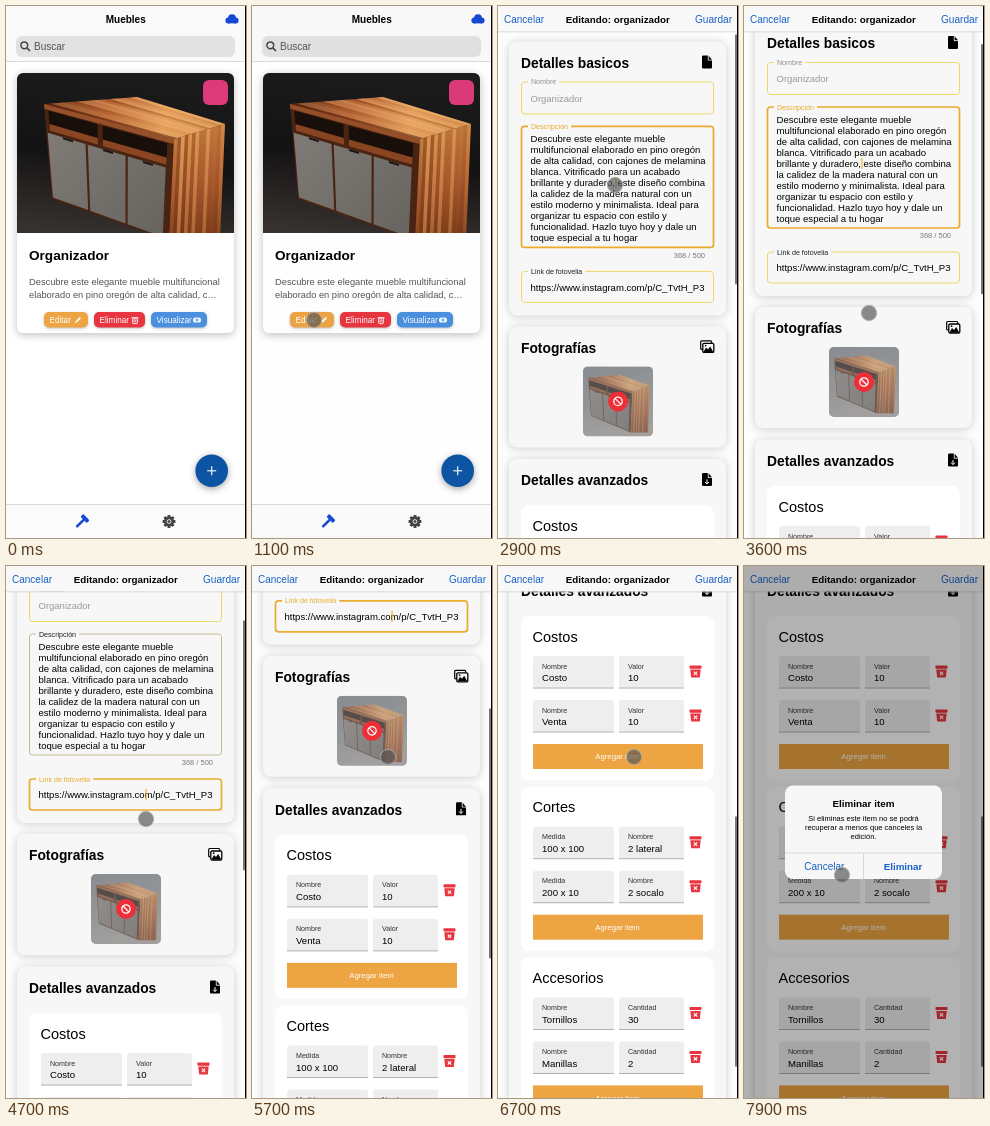
An HTML page with a canvas for the animation above (8 s loop, 240 by 532 pixels).

```html
<!DOCTYPE html>
<html lang="es">
<head>
<meta charset="utf-8">
<title>Muebles</title>
<style>
html, body { margin: 0; width: 100%; height: 100%; overflow: hidden; background: #fff; }
canvas { display: block; width: 240px; height: 532px; }
</style>
</head>
<body>
<canvas id="stage"></canvas>
<script>
const W = 240, H = 532, LOOP = 8000, BAR = 25.5;
const canvas = document.getElementById('stage');
const c = canvas.getContext('2d');
const dpr = window.devicePixelRatio || 1;
canvas.width = W * dpr;
canvas.height = H * dpr;

const BLUE = '#1763c6', ROYAL = '#1748d4', RED = '#e8353f', ORANGE = '#eda443', GOLD = '#e9ac2c';
const PALE = '#ecd768', IDLE = '#c6bd94', CARD = '#f7f7f7';

// ---------- helpers ----------
const span = (t, a, b) => Math.max(0, Math.min(1, (t - a) / (b - a)));
const smooth = p => p * p * (3 - 2 * p);
const mix = (a, b, p) => a + (b - a) * p;

function text(s, x, y, size, color = '#000', bold = false, align = 'left') {
  c.font = `${bold ? 'bold ' : ''}${size}px "Liberation Sans", Arial, sans-serif`;
  c.textAlign = align;
  c.fillStyle = color;
  c.fillText(s, x, y + size * 0.36);
}
function rect(x, y, w, h, fill) {
  c.fillStyle = fill;
  c.fillRect(x, y, w, h);
}
function paint(fill, stroke, line) {
  if (fill) { c.fillStyle = fill; c.fill(); }
  if (stroke) { c.strokeStyle = stroke; c.lineWidth = line; c.stroke(); }
}
function box(x, y, w, h, r, fill, stroke, line = 1) {
  c.beginPath();
  c.roundRect(x, y, w, h, r);
  paint(fill, stroke, line);
}
function disc(x, y, r, fill, stroke, line = 1) {
  c.beginPath();
  c.arc(x, y, r, 0, 7);
  paint(fill, stroke, line);
}
function poly(fill, ...p) {
  c.beginPath();
  for (let i = 0; i < p.length; i += 2) c.lineTo(p[i], p[i + 1]);
  c.closePath();
  paint(fill);
}
function line(color, width, x1, y1, x2, y2) {
  c.beginPath();
  c.moveTo(x1, y1);
  c.lineTo(x2, y2);
  paint(null, color, width);
}
function shadow(blur, alpha, dy, draw) {
  c.save();
  c.shadowColor = `rgba(0,0,0,${alpha})`;
  c.shadowBlur = blur * dpr;
  c.shadowOffsetY = dy * dpr;
  draw();
  c.restore();
}
function at(x, y, draw, angle = 0, sx = 1, sy = sx) {
  c.save();
  c.translate(x, y);
  c.rotate(angle);
  c.scale(sx, sy);
  draw();
  c.restore();
}
function clipped(x, y, w, h, r, draw) {
  c.save();
  c.beginPath();
  c.roundRect(x, y, w, h, r);
  c.clip();
  draw();
  c.restore();
}
function gradient(x1, y1, x2, y2, ...colors) {
  const g = c.createLinearGradient(x1, y1, x2, y2);
  colors.forEach((col, i) => g.addColorStop(i / (colors.length - 1), col));
  return g;
}
function seeded(seed) {
  return () => (seed = (seed * 16807) % 2147483647) / 2147483647;
}

// ---------- icons, drawn around their centre ----------
function cloud() {
  for (const i of [-1, 0, 1]) disc(i * 3.7, i ? 1.5 : -0.7, i ? 2.9 : 4, ROYAL);
  rect(-4, 0, 8, 4.4, ROYAL);
}
function hammer() {
  box(-1.3, -3, 2.6, 11, 1, ROYAL);
  box(-4.5, -6.2, 9, 4, 1.2, ROYAL);
}
function gear() {
  for (let i = 0; i < 4; i++) at(0, 0, () => box(-1.5, -6.5, 3, 13, 0.8, '#444'), i * Math.PI / 4);
  disc(0, 0, 5, '#444');
  disc(0, 0, 1.9, '#444', '#f5f5f5', 0.9);
}
function bin() {
  box(-6, -6, 12, 3.2, 0.8, RED);
  poly(RED, -5.2, -2, 5.2, -2, 4.3, 6, -4.3, 6);
  for (const s of [-1.7, 1.7]) line('#fff', 1.1, -s, 0.2, s, 3.6);
}
function sheet(arrow) {
  box(-5, -6.5, 10, 13, 1.2, '#000');
  poly(CARD, 0.8, -7, 5.5, -7, 5.5, -1.4, 0.8, -1.4);
  poly('#000', 1.6, -6.2, 5, -2.2, 1.6, -2.2);
  if (!arrow) return;
  line('#fff', 1, 0, 0, 0, 4.5);
  for (const s of [-2, 2]) line('#fff', 1, s, 2.6, 0, 4.6);
}
function pictures() {
  box(-6.3, -5.5, 11, 8.5, 1, null, '#000', 1.2);
  box(-4.2, -3, 11, 9, 1.2, CARD, '#000', 1.3);
  poly('#000', -3.5, 5.5, -1, 1, 1, 3, 3.2, 0, 6.2, 5.5);
  disc(-1.4, -0.8, 0.9, '#000');
}
function pencil() {
  at(0, 0, () => {
    rect(-0.9, -3.2, 1.8, 5.5, '#fff');
    poly('#fff', -0.9, 2.6, 0.9, 2.6, 0, 4.3);
  }, Math.PI / 4);
}
function smallBin() {
  box(-2.4, -1.8, 4.8, 5.4, 0.8, null, '#fff', 0.9);
  line('#fff', 0.9, -3.5, -2.3, 3.5, -2.3);
  for (const x of [-0.8, 0.8]) line('#fff', 0.8, x, -0.6, x, 2.4);
}
function eye() {
  box(-4, -2.6, 8, 5.2, 2.6, '#fff');
  disc(0, 0, 1.2, '#fff', '#4a90df', 0.9);
}

// ---------- furniture picture ----------
const FRONT = [[27, 31], [157, 66], [152, 168], [35, 126]];
const SIDE = [FRONT[1], [208, 51], [203, 168], FRONT[2]];
const TOP = [FRONT[0], [120, 24], SIDE[1], FRONT[1]];

// fills part of a four-cornered face, u and v running from 0 to 1
function panel([a, b, d, e], u0, v0, u1, v1, fill) {
  const spot = (u, v) => [0, 1].map(k => mix(mix(a[k], b[k], u), mix(e[k], d[k], u), v));
  poly(fill, ...spot(u0, v0), ...spot(u1, v0), ...spot(u1, v1), ...spot(u0, v1));
}
function cabinet() {
  const rnd = seeded(7);
  const grain = () => rnd() < 0.5 ? `rgba(70,25,5,${rnd() * 0.5})` : `rgba(255,195,125,${rnd() * 0.45})`;
  panel(FRONT, 0, 0, 1, 1, '#4a2412');
  for (let i = 0; i < 2; i++) {
    const u = 0.03 + i * 0.42;
    panel(FRONT, u, 0.06, u + 0.38 + i * 0.12, 0.27, '#180e0a');
    panel(FRONT, u, 0.2, u + 0.38 + i * 0.12, 0.27, '#8a4522');
  }
  for (let i = 0; i < 3; i++) {
    const u = 0.01 + i * 0.318;
    panel(FRONT, u, 0.3, u + 0.3, 0.98, gradient(30, 50, 140, 168, '#817c77', '#67645f'));
    panel(FRONT, u + 0.12, 0.3, u + 0.2, 0.32, '#1b1512');
  }
  panel(TOP, 0, 0, 1, 1, gradient(27, 30, 208, 60, '#642f16', '#a9552a', '#e09a58', '#d08a4a'));
  panel(SIDE, 0, 0, 1, 1, gradient(160, 60, 200, 168, '#d58a45', '#b66232', '#7d3c19'));
  for (let i = 0; i < 14; i++) {
    const u = i / 14;
    panel(TOP, u, 0, u + 0.07, 1, grain());
    panel(SIDE, u, 0, u + 0.07, 1, grain());
  }
  panel(FRONT, 0, 0, 1, 0.05, '#96502a');
}
function photo() {
  clipped(11, 67, 217, 160, [6, 6, 0, 0], () => {
    rect(11, 67, 217, 160, gradient(80, 67, 60, 227, '#1b1b1c', '#141313', '#37322f'));
    at(11, 67, cabinet);
  });
  box(197, 74, 25, 25, 6, '#dc3a78');
}
function thumbnail(x, y) {
  clipped(x, y, 70, 70, 5, () => {
    rect(x, y, 70, 70, gradient(x, y, x + 20, y + 70, '#747a80', '#85888a', '#a09d98'));
    at(x - 4, y - 1, cabinet, 0, 0.34, 0.4);
    rect(x, y, 70, 70, 'rgba(165,165,168,.42)');
  });
  disc(x + 35, y + 35, 10, '#ee2f37');
  disc(x + 35, y + 35, 4.2, null, '#fff', 1.3);
  line('#fff', 1.3, x + 32, y + 32, x + 38, y + 38);
}

// ---------- list page ----------
function pill(x, w, color, label, icon) {
  shadow(3, 0.25, 1, () => box(x, 306, w, 15.5, 5, color));
  text(label, x + 5.5, 313.9, 8.2, '#fff');
  at(x + w - 10, 314, icon);
}
function listPage() {
  rect(0, 0, W, H, '#fff');
  rect(0, 0, W, 55, '#f9f9f9');
  rect(0, 55, W, 0.8, '#d2d2d2');
  text('Muebles', 119.7, 13, 10, '#000', true, 'center');
  at(226, 13, cloud);
  box(10, 30, 219, 21, 6, '#e1e1e2');
  disc(18.3, 39.3, 3.4, null, '#444', 1.5);
  line('#444', 1.7, 20.8, 41.8, 24, 45);
  text('Buscar', 28, 40.7, 10, '#555');

  shadow(9, 0.25, 2, () => box(11, 67, 217, 260, 6, '#fff'));
  photo();
  text('Organizador', 23, 249.5, 13.6, '#000', true);
  text('Descubre este elegante mueble multifuncional', 23, 275.5, 9.3, '#555');
  text('elaborado en pino oregón de alta calidad, c…', 23, 288.5, 9.3, '#555');
  pill(38, 44, ORANGE, 'Editar', pencil);
  pill(88, 51, RED, 'Eliminar', smallBin);
  pill(145, 56, '#4a90df', 'Visualizar', eye);

  shadow(7, 0.35, 2, () => disc(205.7, 464.8, 16.3, '#0d55a4'));
  for (const a of [0, Math.PI / 2]) at(205.7, 464.8, () => line('#fff', 1.1, -4.5, 0, 4.5, 0), a);
  rect(0, 498, W, 34, '#fbfbfb');
  rect(0, 498, W, 0.8, '#d2d2d2');
  at(76, 515.5, hammer, Math.PI / 4);
  at(163, 515.5, gear);
}

// ---------- edit page ----------
const STORY = [
  'Descubre este elegante mueble',
  'multifuncional elaborado en pino oregón',
  'de alta calidad, con cajones de melamina',
  'blanca. Vitrificado para un acabado',
  'brillante y duradero, este diseño combina',
  'la calidez de la madera natural con un',
  'estilo moderno y minimalista. Ideal para',
  'organizar tu espacio con estilo y',
  'funcionalidad. Hazlo tuyo hoy y dale un',
  'toque especial a tu hogar'
];
const GROUPS = [
  ['Costos', 'Nombre', 'Valor', ['Costo', '10'], ['Venta', '10']],
  ['Cortes', 'Medida', 'Nombre', ['100 x 100', '2 lateral'], ['200 x 10', '2 socalo']],
  ['Accesorios', 'Nombre', 'Cantidad', ['Tornillos', '30'], ['Manillas', '2']]
];

function card(y, h, title) {
  shadow(10, 0.2, 1, () => box(11, y, 217, h, 8, CARD));
  text(title, 23, y + 21.5, 13.8, '#000', true);
}
function outline(y, h, label, focused, border, color = '#222') {
  box(23.5, y, 192, h, 3, null, focused ? GOLD : border, focused ? 1.7 : 1);
  c.font = '7.1px "Liberation Sans", Arial, sans-serif';
  c.textAlign = 'left';
  rect(30, y - 2, c.measureText(label).width + 6, 4, CARD);
  text(label, 33, y, 7.1, focused ? GOLD : color);
}
function caret(x, y, age) {
  if (age % 1000 < 860) rect(x, y - 5.5, 1.1, 11, GOLD);
}
function input(x, y, w, label, value) {
  box(x, y, w, 32, [3, 3, 0, 0], '#eee');
  rect(x, y + 31.6, w, 0.9, '#a9a9a9');
  text(label, x + 9, y + 10, 7.1, '#333');
  text(value, x + 9, y + 21.8, 9.6);
}
function group([title, left, right, ...rows], y) {
  box(23, y, 193, 164.5, 8, '#fff');
  text(title, 34.5, y + 20.3, 14.5);
  rows.forEach(([a, b], i) => {
    const top = y + 40 + i * 44;
    input(35, top, 81, left, a);
    input(121, top, 65, right, b);
    at(197.5, top + 15.5, bin);
  });
  rect(35, y + 128, 170, 25, ORANGE);
  text('Agregar item', 119.5, y + 140.3, 7.8, '#fff', false, 'center');
}
function editPage(t, scroll) {
  const onLink = t >= LINK_TAP, onDesc = t >= DESC_TAP && !onLink;
  rect(0, 0, W, H, '#fdfdfd');
  at(0, -scroll, () => {
    card(37, 274, 'Detalles basicos');
    at(209, 57.5, () => sheet(false));
    outline(77.5, 32, 'Nombre', false, PALE, '#8f8f8f');
    text('Organizador', 32.5, 94, 9.5, '#999');
    outline(122, 121, 'Descripción', onDesc, onLink ? IDLE : '#e6c93c');
    STORY.forEach((s, i) => text(s, 32.5, 134.5 + i * 11, 9.55));
    if (onDesc) caret(117.5, 178.5, t - DESC_TAP);
    text('368 / 500', 207, 250.7, 7.5, '#777', false, 'right');
    outline(267, 31, 'Link de fotovelia', onLink, PALE);
    text('https://www.instagram.com/p/C_TvtH_P3', 32.5, 282.7, 9.55);
    if (onLink) caret(139.5, 282.5, t - LINK_TAP);

    card(322, 121, 'Fotografías');
    at(209, 342, pictures);
    thumbnail(85, 362);

    card(454.5, 563, 'Detalles avanzados');
    at(209, 475, () => sheet(true));
    GROUPS.forEach((g, i) => group(g, 501 + i * 170.7));
  });

  rect(0, 0, W, BAR, '#f8f8f8');
  rect(0, BAR, W, 0.8, '#cfcfcf');
  text('Cancelar', 6, 13, 10, BLUE);
  text('Editando: organizador', 119.8, 13, 9.8, '#000', true, 'center');
  text('Guardar', 234, 13, 10.1, BLUE, false, 'right');

  const view = H - BAR, ratio = view / 1025;
  box(237, BAR + 2 + scroll * ratio, 2, view * ratio, 1, '#777');
}

// ---------- alert ----------
function alertBox(p) {
  rect(0, 0, W, H, `rgba(0,0,0,${0.3 * p})`);
  c.globalAlpha = p;
  at(119.5, 266, () => {
    box(-78.5, -46.5, 157, 93.5, 8, CARD);
    text('Eliminar item', 0, -29, 9.9, '#000', true, 'center');
    ['Si eliminas este item no se podrá', 'recuperar a menos que canceles la', 'edición.']
      .forEach((s, i) => text(s, 0, -14 + i * 9.2, 7.5, '#000', false, 'center'));
    rect(-78.5, 20.6, 157, 0.8, '#cdcdcd');
    rect(-0.4, 21, 0.8, 26, '#cdcdcd');
    text('Cancelar', -39.2, 34, 10, BLUE, false, 'center');
    text('Eliminar', 39.5, 34, 9.8, BLUE, true, 'center');
  }, 0, mix(1.1, 1, smooth(p)));
  c.globalAlpha = 1;
}

// ---------- motion ----------
const OPEN = 1100, DESC_TAP = 2760, LINK_TAP = 4120, ALERT = 7000;
// start, end, distance: focusing a field nudges the page, then one long scroll
const SCROLLS = [
  [DESC_TAP + 90, DESC_TAP + 390, 21],
  [LINK_TAP + 90, LINK_TAP + 390, 33],
  [4830, 6700, 397]
];
// start, end, x, y: the pointer rests between moves
const MOVES = [
  [300, 850, 62, 314], [1200, 1800, 118, 89], [2150, 2680, 117, 179], [3100, 3580, 125, 307],
  [3620, 4060, 140, 253], [4720, 5250, 136, 191], [6710, 6930, 197, 149], [7120, 7800, 98, 309]
];

function pointer(t) {
  let x = 130, y = 400;
  for (const [a, b, nx, ny] of MOVES) {
    const p = smooth(span(t, a, b));
    x = mix(x, nx, p);
    y = mix(y, ny, p);
  }
  c.globalAlpha = span(t, 200, 350);
  disc(x, y, 7.6, 'rgba(80,80,80,.66)', 'rgba(165,165,165,.75)', 1.1);
  c.globalAlpha = 1;
}

function draw(t) {
  c.setTransform(dpr, 0, 0, dpr, 0, 0);
  const rise = 1 - (1 - span(t, OPEN, OPEN + 500)) ** 4;
  const scroll = SCROLLS.reduce((sum, [a, b, d]) => sum + d * smooth(span(t, a, b)), 0);
  const alert = span(t, ALERT, ALERT + 180);
  if (rise < 1) listPage();
  if (rise > 0) {
    rect(0, 0, W, H, `rgba(0,0,0,${0.35 * rise})`);
    at(0, (1 - rise) * H, () => editPage(t, scroll));
  }
  if (alert) alertBox(alert);
  pointer(t);
  rect(W - 1, 0, 1, H, '#000');
}

const start = performance.now();
function tick() {
  draw((performance.now() - start) % LOOP);
  requestAnimationFrame(tick);
}
tick();
</script>
</body>
</html>
```
